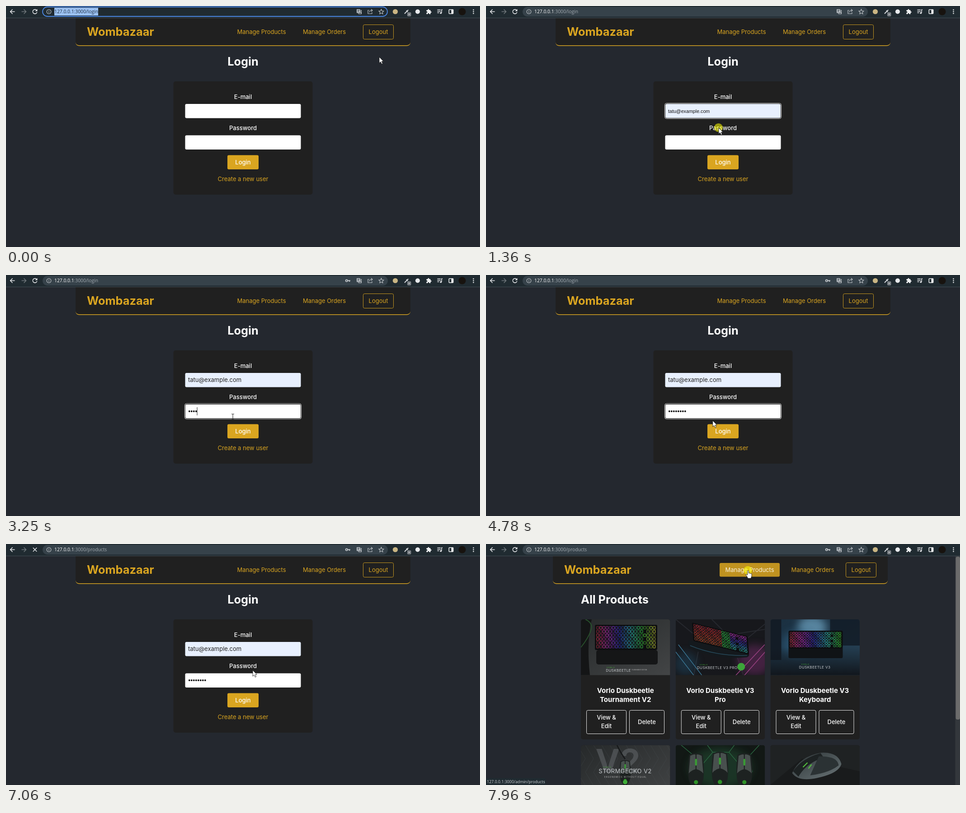
Write an HTML page that moves like this. It is 1049 px wide and 534 px high and loops after 7990 ms.

```html
<!DOCTYPE html>
<html lang="en">
<head>
<meta charset="utf-8">
<title>Shop login</title>
<style>
html, body { margin: 0; width: 100%; height: 100%; overflow: hidden; background: #24282f; }
svg { display: block; width: 100%; height: 100%; }
text { font-family: Inter, sans-serif; font-size: 13px; fill: #fff; white-space: pre; }
.mid { text-anchor: middle; }
.gold { fill: #daa520; }
.bold { font-weight: 700; }
.title { font-size: 15px; font-weight: 700; }
.big { font-size: 25.3px; font-weight: 700; }
.label { font-weight: 500; }
.ui { font-family: "Open Sans", sans-serif; font-size: 10.3px; }
.dim { fill: #9aa3a9; }
.small { font-family: "Liberation Sans", Arial, sans-serif; font-size: 10.7px; }
.line { fill: none; stroke: #e8eaed; stroke-width: 1.5; }
.thin { fill: none; stroke: #c4c9cd; stroke-width: 1.1; }
</style>
</head>
<body>
<svg id="stage" viewBox="0 0 1049 534" preserveAspectRatio="none" xmlns="http://www.w3.org/2000/svg"></svg>
<script>
const LOOP = 7990;
const BRAND = 'Wombazaar';
const MAIL = 'tatu@example.com';
const OTHER_MAILS = ['anta@example.com', 'lobo@example.org', 'puma@example.net', 'boto@example.com'];
const GOLD = [218, 165, 32], GREY = [104, 103, 102], WHITE = [255, 255, 255], DARK = [32, 32, 32];

const rect = (x, y, w, h, fill, r = 0, more = '') =>
  `<rect x="${x}" y="${y}" width="${w}" height="${h}" rx="${r}" fill="${fill}" ${more}/>`;
const text = (x, y, s, cls = '', more = '') => `<text x="${x}" y="${y}" class="${cls}" ${more}>${s}</text>`;
const path = (d, cls = '', more = '') => `<path d="${d}" class="${cls}" ${more}/>`;
const circle = (x, y, r, fill, more = '') => `<circle cx="${x}" cy="${y}" r="${r}" fill="${fill}" ${more}/>`;
const group = (id, body, more = '') => `<g id="${id}" ${more}>${body}</g>`;
const at = (x, y, body) => `<g transform="translate(${x} ${y})">${body}</g>`;
const repeat = (n, f) => Array.from({ length: n }, (_, i) => f(i)).join('');

// Browser toolbar
function toolbar() {
  const arrow = path('M5 0H-5M0-5L-5 0L0 5', 'line');
  return rect(0, 0, 1049, 26, '#202b31') + rect(0, 26, 1049, 1, '#414b52') +
    group('pill', rect(81, 2, 764, 21.5, '#36424a', 10.75)) +
    group('pillFocus', rect(81, 2, 763, 21, '#202b31', 10.5, 'stroke="#4b86e0" stroke-width="1.8"') +
      rect(107, 4, 97, 17, '#9dc4f6')) +
    at(14.5, 12.5, arrow) +
    at(39.5, 12.5, `<g transform="scale(-1 1)" opacity=".4">${arrow}</g>`) +
    group('reload', path('M67.6 9.2A4.8 4.8 0 1 0 68.7 13.6', 'line') + path('M69.4 6.8V11.6H64.6Z', '', 'fill="#e8eaed"')) +
    group('stop', path('M59.8 8.3L68.2 16.7M68.2 8.3L59.8 16.7', 'line')) +
    circle(95, 12.5, 4.8, 'none', 'stroke="#c4c9cd" stroke-width="1.1"') +
    path('M95 11.8V15.2M95 9.6V10.8', 'thin') +
    `<text x="107" y="16.3" class="ui"><tspan id="host">127.0.0.1</tspan><tspan id="route"></tspan></text>` +
    group('key', circle(753.8, 12.5, 2.2, 'none', 'stroke="#c4c9cd" stroke-width="1.7"') +
      path('M756 12.5H762M760.2 12.5V15', '', 'stroke="#c4c9cd" stroke-width="1.8" fill="none"')) +
    rect(776, 7, 7.5, 8.5, '#b5bbc0', 1) + path('M777.5 9.3H782M779.7 8.2V9.3M781.3 9.5L778 13.3M778.3 10.5L781.5 13.3', '', 'stroke="#36424a" fill="none" stroke-width=".9"') +
    path('M783.5 9.5H786.5V17.5H780.5L779.5 15.5M782 16L784 11.8L786 16', 'thin') +
    path('M803.5 9.5H801V17H810V14M803.8 14C804 11 806 9.8 810.5 9.8M808 7L811 9.8L808 12.6', 'thin') +
    path('M830.5 7.2L832.1 10.8L836 11.2L833.1 13.8L833.9 17.6L830.5 15.6L827.1 17.6L827.9 13.8L825 11.2L828.9 10.8Z', 'thin') +
    circle(861.5, 12.5, 5.6, '#c9b583') +
    path('M882 17L887.5 11.5M886 9.8L889.2 13M888 11L890.3 8.7', '', 'stroke="#d5d9dc" stroke-width="1.9" fill="none"') +
    rect(888, 14, 8.5, 9, '#7a8085', 2) + path('M891 18.5H893.6', '', 'stroke="#fff"') +
    circle(911, 12.5, 5, '#e8eaed') +
    path('M930.5 9H933.6C932.8 6 937.2 6 936.4 9H939.5V12C942.4 11.2 942.4 15.6 939.5 14.8V18H936.5C937 15 932.8 15 933.5 18H930.5V14.8C933.3 15.4 933.3 11.4 930.5 12Z', '', 'fill="#f1f3f4"') +
    path('M954.5 8.5H962M954.5 11.8H962M954.5 15H958.5M964 15.5V8.3H966', 'line') + circle(962.3, 15.6, 1.9, '#e8eaed') +
    rect(980.3, 8, 9.4, 9, 'none', 1, 'stroke="#f1f3f4" stroke-width="1.5"') + rect(985.5, 8, 4, 9, '#f1f3f4') +
    circle(1009.5, 12.5, 8, '#17130f') +
    repeat(3, i => circle(1034.5, 8.5 + i * 4, 1.25, '#f1f3f4'));
}

function nav(x, products, orders, logout) {
  const sheet = (bottom, ry, fill) =>
    path(`M${x} 27H${x + 741}V${bottom - ry}a8 ${ry} 0 0 1 -8 ${ry}H${x + 8}a8 ${ry} 0 0 1 -8 ${-ry}Z`, '', `fill="${fill}"`);
  return sheet(88.5, 8, '#daa520') + sheet(87, 6.5, '#202020') +
    text(x + 25, 66, BRAND, 'big gold') + products +
    text(orders, 62, 'Manage Orders', 'gold mid') +
    rect(logout + .5, 41.5, 67, 32, 'none', 3, 'stroke="#daa520" stroke-width=".9"') +
    text(logout + 34, 62, 'Logout', 'gold mid');
}

const ring = (id, y) => group(id,
  rect(395.5, y - 1, 258, 34, 'none', 4, 'stroke="#fff"') +
  rect(396.5, y, 256, 32, 'none', 3, 'stroke="#101010"'));
const caret = (id, y) => rect(402.5, y, 1, 18, '#222', 0, `id="${id}"`);

function popup(id, y, h, rows) {
  return group(id, rect(397, y, 255, h, '#292a2d', 3) + rect(397, y + 5, 255, 32, '#3b3d41') +
    rows.map((s, i) => text(407, y + 25 + i * 33, s, 'ui')).join(''));
}

function loginPage() {
  return nav(154, text(565.5, 62, 'Manage Products', 'gold mid'), 704.5, 790) +
    text(524.5, 132, 'Login', 'big mid') +
    rect(370.5, 167, 308, 251, '#202020', 5) +
    text(524.5, 205.5, 'E-mail', 'label mid') +
    text(524.5, 275, 'Password', 'label mid') +
    rect(396.5, 217, 256, 31.5, '#fff', 3, 'id="mailBox"') + ring('mailRing', 216.5) +
    rect(396.5, 286.5, 256, 31.5, '#fff', 3) + ring('passRing', 286) +
    text(403, 237, MAIL, 'small', 'id="preview" style="fill:#111"') +
    text(403, 237, MAIL, '', 'id="mail" style="fill:#222"') +
    caret('mailCaret', 224) +
    group('dots', repeat(8, i => circle(405.8 + i * 5, 302, 1.9, '#111'))) +
    caret('passCaret', 293) +
    rect(490, 330.5, 69, 31.5, '#daa520', 3, 'id="submit"') +
    text(524.5, 350.5, 'Login', 'label mid') +
    text(524.5, 388, 'Create a new user', 'gold mid') +
    popup('mailPopup', 250, 179, [MAIL, ...OTHER_MAILS]) +
    popup('passPopup', 320, 69, [MAIL, 'Manage passwords…']);
}

// Pictures are drawn in a 197.5 x 123.5 box
function keyboard(x, y, w, h, hue = c => 350 - c * 16) {
  const cols = 19, rows = 6, dx = (w - 6) / cols, dy = (h - 6) / rows;
  return rect(x, y, w, h, '#0d0e10', 3) + repeat(rows, r => repeat(cols, c =>
    c === 15 && r % 2 ? '' :
    rect((x + 3.5 + c * dx).toFixed(1), (y + 3.5 + r * dy).toFixed(1), (dx * .75).toFixed(1), (dy * .75).toFixed(1),
      '#17181b', .8, `stroke="hsl(${(hue(c, r) + 720) % 360} 60% ${32 + (c * 7 + r * 5) % 4 * 6}%)" stroke-width=".9"`)));
}
const caption = (x, y, s, size = 8) => text(x, y, s, 'mid', `style="font-size:${size}px;fill:#c8cccf;letter-spacing:.4px"`);
const maker = (x, y) => text(x, y, 'VORLO', '', 'style="font-size:4px;fill:#49b63b;letter-spacing:1px"');
const glow = (x, y, rx, ry, fill, opacity) =>
  `<ellipse cx="${x}" cy="${y}" rx="${rx}" ry="${ry}" fill="${fill}" opacity="${opacity}" filter="url(#soft)"/>`;
const mouse = (x, y, s) => `<g transform="translate(${x} ${y}) scale(${s})">` +
  path('M-13-24Q0-30 13-24Q17 0 14 24Q8 42 0 43Q-8 42-14 24Q-17 0-13-24Z', '', 'fill="#1d2221"') +
  path('M-11-22Q-3-26-1-24V4Q-9 6-14 12M11-22Q3-26 1-24V4Q9 6 14 12', '', 'fill="#48504e"') +
  rect(-2, -16, 4, 13, '#3a9a35', 2) + circle(0, 29, 4, '#2f9228') + '</g>';

const pictures = [
  () => rect(0, 0, 198, 124, 'url(#slate)') + path('M0 0H24Q12 50 20 124H0Z', '', 'fill="#141516"') +
    path('M10 0Q28 8 22 25T0 62', '', 'fill="none" stroke="#28502c" stroke-width="2"') +
    rect(34, 68, 136, 32, '#151617', 5) + keyboard(31, 12, 138, 56) +
    maker(57, 108) + caption(83, 116, 'DUSKBEETLE') + text(112, 113, 'TOURNAMENT EDITION', '', 'style="font-size:3px;fill:#bbb"'),
  () => rect(0, 0, 198, 124, '#17181c') + path('M0 0L55 45L40 124M198 10L130 65L150 124M80 0L115 35L198 22', '', 'fill="none" stroke="#26282e" stroke-width="2"') +
    glow(175, 90, 38, 34, '#7b2f70', .45) + glow(22, 98, 26, 26, '#24516e', .4) +
    path('M6 56L58 124M0 72L40 124', '', 'stroke="#3b7897" stroke-width="1.4"') +
    path('M197 56L133 124M198 72L152 124', '', 'stroke="#96407f" stroke-width="1.6"') +
    path('M28 46L160 74Q166 80 158 84Q90 90 30 64Z', '', 'fill="#14191d"') +
    path('M32 58Q90 82 158 80', '', 'fill="none" stroke="#26495a" stroke-width="1.5"') +
    `<g transform="matrix(.98 .24 .06 .82 36 7)">${keyboard(0, 0, 126, 50, (c, r) => c < 10 ? 355 + r * 4 : c < 13 ? 130 : 300 - r * 25)}</g>` +
    maker(53, 102) + caption(92, 110, 'DUSKBEETLE V3 PRO') + circle(145, 105, 8.5, '#3da43a'),
  () => rect(0, 0, 198, 124, 'url(#teal)') + glow(92, 18, 32, 26, '#6fa6c4', .7) + glow(60, 55, 34, 30, '#2f5f80', .6) +
    rect(0, 0, 24, 90, '#131c26') + rect(132, 0, 66, 58, '#111a23', 0, 'opacity=".8"') +
    rect(0, 62, 198, 62, 'url(#shade)') +
    rect(40, 62, 120, 24, '#101316', 3) + keyboard(40, 25, 120, 40, c => 350 - c * 13) +
    maker(68, 101) + caption(98, 109, 'DUSKBEETLE V3'),
  () => rect(0, 0, 198, 124, 'url(#slate)') + repeat(12, i => path(`M${i * 18 - 8} 0L${i * 18 + 10} 30L${i * 18 - 8} 60L${i * 18 + 10} 90`, '', 'fill="none" stroke="#555b5f" opacity=".25"')) +
    text(82, 60, 'V2', 'mid bold', 'style="font-size:72px;fill:#686d71;opacity:.5"') +
    path('M80 0Q88 18 98 31', '', 'fill="none" stroke="#191b1c" stroke-width="3"') + mouse(98, 55, .8) +
    maker(49, 50) + caption(98, 62, 'STORMGECKO V2', 13) + text(99, 72, 'ERGONOMICS WITHOUT EQUAL', 'mid', 'style="font-size:4.5px;fill:#bbb;letter-spacing:1px"') + circle(98, 82, 5, '#3fae38'),
  () => rect(0, 0, 198, 124, '#121815') + glow(99, 50, 70, 45, '#234a33', .6) +
    path('M12 0L36 20L30 60M70 0L82 16H118L130 0M185 0L162 25L170 60M82 16L60 42M118 16L140 42', '', 'fill="none" stroke="#2a6540" stroke-width="1.4"') +
    mouse(45, 49, 1.15) + mouse(98, 47, 1.2) + mouse(152, 49, 1.15),
  () => rect(0, 0, 198, 124, '#191b1c') + path('M0 88L70 30L198 58V0H0Z', '', 'fill="#1f2223"') +
    path('M48 62Q65 25 112 17Q150 15 157 42Q151 63 103 73Q62 82 48 62Z', '', 'fill="url(#shell)"') +
    path('M50 58Q70 29 111 18L118 28Q80 39 62 70Z', '', 'fill="#1d2223"') +
    path('M107 25Q148 24 151 45Q130 62 88 67Z', '', 'fill="#2b3234"') +
    path('M72 49L82 39M84 52L91 43', '', 'stroke="#52bd3d" stroke-width="2.4"')
];
const titles = [['Vorlo Duskbeetle', 'Tournament V2'], ['Vorlo Duskbeetle V3', 'Pro'], ['Vorlo Duskbeetle V3', 'Keyboard']];

function card(i) {
  const [a, b] = titles[i % 3];
  const box = (x, w) => rect(x, 201.5, w, 52, 'none', 3, 'stroke="#fff" stroke-width=".9"');
  return at(210 + i % 3 * 209.75, i < 3 ? 167 : 445.5, `<g clip-path="url(#cardClip)">` +
    rect(0, 0, 197.5, 266, '#202020') + `<g clip-path="url(#photoClip)">${pictures[i]()}</g></g>` +
    text(98.7, 162.5, a, 'title mid') + text(98.7, 183, b, 'title mid') +
    box(12.5, 88) + box(107.5, 77) +
    text(56.5, 222, 'View &amp;', 'mid label') + text(56.5, 241, 'Edit', 'mid label') + text(146, 232, 'Delete', 'mid label'));
}

function productsPage() {
  return nav(148, rect(517, 42, 133, 30.5, '#202020', 3, 'id="navHover"') +
      text(583.5, 62, 'Manage Products', 'mid', 'id="navText"'), 723, 796) +
    text(210, 132, 'All Products', 'big') + repeat(6, card) +
    rect(1038.5, 27, 10.5, 507, '#33373c') + rect(1039.5, 28, 9.5, 361, '#6b6b6b', 4) +
    group('status', path('M0 518.5H129Q132 518.5 132 522V534H0Z', '', 'fill="#202b31"') +
      text(2, 529.5, '127.0.0.1:3000/admin/products', 'ui', 'style="font-size:8.8px;fill:#cdd2d6"'));
}

const cursors =
  circle(-.5, -.5, 9.5, '#ffff00', 'id="halo" opacity=".55"') +
  group('arrow', path('M0 0V13.4L3.1 10.6L5.3 15.4L7.6 14.4L5.4 9.7H9.4Z', '', 'fill="#fff" stroke="#111" stroke-width=".8"')) +
  group('beam', path('M-3-6H-1L0-5.2L1-6H3M0-5.2V5.2M-3 6H-1L0 5.2L1 6H3', '', 'fill="none" stroke="#333" stroke-width="1.1"')) +
  group('hand', path('M-1.3.5Q0-1.2 1.3.5V6L2.3 5.3Q3.6 5.2 3.8 6.3Q5.2 5.2 6 6.9Q7.6 6 8 7.8V12L6.3 17H-.5L-2.3 13L-5 9.3Q-4.5 7.4-2.8 8.4L-1.3 10Z', '', 'fill="#fff" stroke="#111" stroke-width=".8"'));

const gradient = (id, a, b, dir = 'x2="1" y2="1"') => `<linearGradient id="${id}" ${dir}><stop stop-color="${a}"/><stop offset="1" stop-color="${b}"/></linearGradient>`;
document.getElementById('stage').innerHTML =
  `<defs>${gradient('slate', '#26292a', '#434546')}${gradient('teal', '#1a2f40', '#274256')}` +
  gradient('shade', '#11161c00', '#11161c', 'x2="0" y2="1"') + gradient('shell', '#2c3335', '#6a7578') +
  `<filter id="soft" x="-50%" y="-50%" width="200%" height="200%"><feGaussianBlur stdDeviation="9"/></filter>
  <clipPath id="cardClip">${rect(0, 0, 197.5, 266, '#000', 5)}</clipPath>
  <clipPath id="photoClip">${rect(0, 0, 197.5, 123.5, '#000')}</clipPath></defs>` +
  rect(0, 0, 1049, 534, '#24282f') + group('login', loginPage()) + group('products', productsPage()) +
  toolbar() + group('pointer', cursors);

const ui = {};
document.querySelectorAll('[id]').forEach(el => ui[el.id] = el);
const dots = [...ui.dots.children];
const show = (el, on) => el.setAttribute('display', on ? 'inline' : 'none');
const within = (t, a, b) => t >= a && t < b;
const ramp = (t, a, b) => Math.min(1, Math.max(0, (t - a) / (b - a)));
const mix = (a, b, k) => `rgb(${a.map((v, i) => Math.round(v + (b[i] - v) * k))})`;

// Pointer track: time, x, y
const track = [
  [0, 826, 113], [70, 826, 113], [790, 560, 226], [920, 560, 226], [1300, 515, 270], [1400, 515, 270],
  [1660, 502, 314], [4560, 502, 314], [5260, 501, 351], [5900, 501, 351],
  [6500, 538, 325], [6930, 538, 325], [7060, 546, 280], [7700, 578, 80], [7860, 580, 59], [7990, 580, 59]
];
const clicks = [[770, 900], [1300, 1440], [2040, 2220], [5290, 5560], [7890, LOOP]];
const keyTimes = [2730, 2940, 3100, 3250, 3410, 3530, 3730, 3900];

function slope(i, c) {
  if (i < 1 || i >= track.length - 1) return 0;
  const d = k => (track[k + 1][c] - track[k][c]) / (track[k + 1][0] - track[k][0]);
  const a = d(i - 1), b = d(i);
  return a * b > 0 ? 2 * a * b / (a + b) : 0;
}

function pointerAt(t) {
  const i = Math.max(0, track.findIndex(p => p[0] > t) - 1);
  const p = track[i], q = track[i + 1], h = q[0] - p[0], s = (t - p[0]) / h;
  return [1, 2].map(c => p[c] + (q[c] - p[c]) * s * s * (3 - 2 * s) +
    h * s * (1 - s) * (slope(i, c) * (1 - s) - slope(i + 1, c) * s));
}

function pointerKind(t, x, y) {
  const over = (l, top, r, b) => within(x, l, r) && within(y, top, b);
  if (t >= 7400) return t >= 7750 ? 'hand' : 'arrow';
  if (over(490, 330, 559, 362)) return 'hand';
  if (over(396, 217, 653, 249) || over(396, 286, 653, 318)) return 'beam';
  return 'arrow';
}

function draw(t) {
  const [x, y] = pointerAt(t), kind = pointerKind(t, x, y), loaded = t >= 7400;
  ui.pointer.setAttribute('transform', `translate(${x.toFixed(2)} ${y.toFixed(2)})`);
  for (const k of ['arrow', 'beam', 'hand']) show(ui[k], k === kind);
  show(ui.halo, clicks.some(([a, b]) => within(t, a, b)));

  const urlFocus = t < 790;
  show(ui.pillFocus, urlFocus);
  show(ui.pill, !urlFocus);
  ui.host.style.fill = urlFocus ? '#1d2b3a' : '#fff';
  ui.route.style.fill = urlFocus ? '#1d2b3a' : '#a5adb3';
  ui.route.textContent = t < 6720 ? ':3000/login' : ':3000/products';
  show(ui.key, t >= 2770);
  const busy = within(t, 5300, 7700);
  show(ui.stop, busy);
  show(ui.reload, !busy);

  show(ui.login, !loaded);
  show(ui.products, loaded);
  show(ui.mailRing, within(t, 790, 1640));
  show(ui.mailCaret, within(t, 790, 1150));
  show(ui.mailPopup, within(t, 860, 1350));
  show(ui.preview, within(t, 1150, 1400));
  show(ui.mail, t >= 1400);
  ui.mailBox.setAttribute('fill', t >= 1150 ? '#e8f0fe' : '#fff');

  const typed = keyTimes.filter(k => k <= t).length;
  dots.forEach((d, i) => show(d, i < typed));
  show(ui.passRing, within(t, 2040, 5300));
  show(ui.passPopup, within(t, 2100, 2230));
  show(ui.passCaret, within(t, 2040, 4430) || within(t, 4960, 5300));
  ui.passCaret.setAttribute('x', 402.5 + typed * 5);
  ui.submit.setAttribute('fill', mix(GOLD, GREY, ramp(t, 4880, 5180) - ramp(t, 6350, 6650)));

  const hover = ramp(t, 7750, 7995);
  ui.navHover.setAttribute('fill', mix(DARK, GOLD, hover));
  ui.navText.style.fill = mix(GOLD, WHITE, hover);
  show(ui.status, t >= 7780);
}

const start = performance.now();
function tick(now) {
  draw(Math.max(0, now - start) % LOOP);
  requestAnimationFrame(tick);
}
draw(0);
requestAnimationFrame(tick);
</script>
</body>
</html>
```
